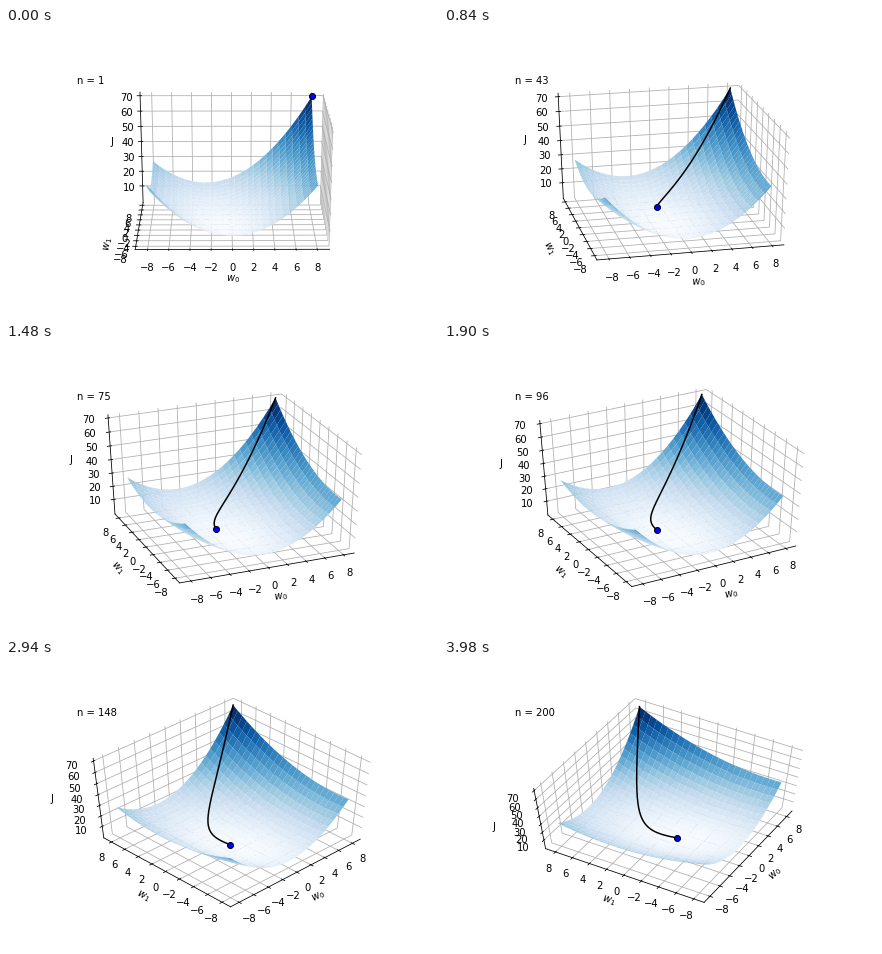
A matplotlib script for the animation above (4000 ms loop, 432x288 px).

```python
import numpy as np
import matplotlib.pyplot as plt
from matplotlib.animation import FuncAnimation

FRAMES = 200
RATE = 0.05
SPAN = 8
HESS = np.array([[1.0, 0.168], [0.168, 0.31]])
BEST = np.array([-0.97, -1.98])
FLOOR = 0.1


def cost(w0, w1):
    a, b = w0 - BEST[0], w1 - BEST[1]
    return FLOOR + 0.5 * (HESS[0, 0] * a**2 + 2 * HESS[0, 1] * a * b + HESS[1, 1] * b**2)


def descend(start, steps):
    path = [np.array(start, float)]
    for _ in range(steps - 1):
        path.append(path[-1] - RATE * HESS @ (path[-1] - BEST))
    return np.array(path)


def padded(lo, hi, pad=1 / 48):
    d = (hi - lo) * pad
    return lo - d, hi + d


fig = plt.figure(figsize=(6, 4), dpi=72, facecolor="white")
fig.subplots_adjust(left=0.125, right=0.9, bottom=0.125, top=0.88)
ax = fig.add_subplot(projection="3d", computed_zorder=False)
# let the cube fill the wide axes rectangle instead of a square
ax.apply_aspect = lambda position=None: None
ax.set_box_aspect((1, 1, 1), zoom=np.sqrt(3) / 1.8294640721620434)

grid = np.linspace(-SPAN, SPAN, 26)
X, Y = np.meshgrid(grid, grid)
Z = cost(X, Y)
ax.plot_surface(X, Y, Z, rstride=1, cstride=1, cmap="Blues", zorder=1)

path = descend((SPAN, SPAN), FRAMES)
heights = cost(path[:, 0], path[:, 1])
trail, = ax.plot([], [], [], color="black", lw=1.5, zorder=5)
ball, = ax.plot([], [], [], "o", ms=6, mfc="blue", mec="black", mew=1, zorder=6)
counter = ax.text2D(0.05, 0.9, "", transform=ax.transAxes)

side = padded(-1.1 * SPAN, 1.1 * SPAN)
ax.set_xlim(*side)
ax.set_ylim(*side)
ax.set_zlim(*padded(Z.min(), Z.max()))
ax.set_xticks(range(-8, 9, 2))
ax.set_yticks(range(-8, 9, 2))
ax.set_zticks(range(10, 71, 10))
ax.set_xlabel("$w_0$")
ax.set_ylabel("$w_1$")
ax.set_zlabel("J")
for axis in (ax.xaxis, ax.yaxis, ax.zaxis):
    axis.set_pane_color((1, 1, 1, 1))


def update(i):
    n = i + 1
    trail.set_data_3d(path[:n, 0], path[:n, 1], heights[:n])
    ball.set_data_3d(path[i:n, 0], path[i:n, 1], heights[i:n])
    counter.set_text(f"n = {n}")
    ax.view_init(elev=20 + 0.2 * n, azim=-90 - 0.3 * n)
    return trail, ball, counter


anim = FuncAnimation(fig, update, frames=FRAMES, interval=20, repeat=True, repeat_delay=0)
plt.show()
```
